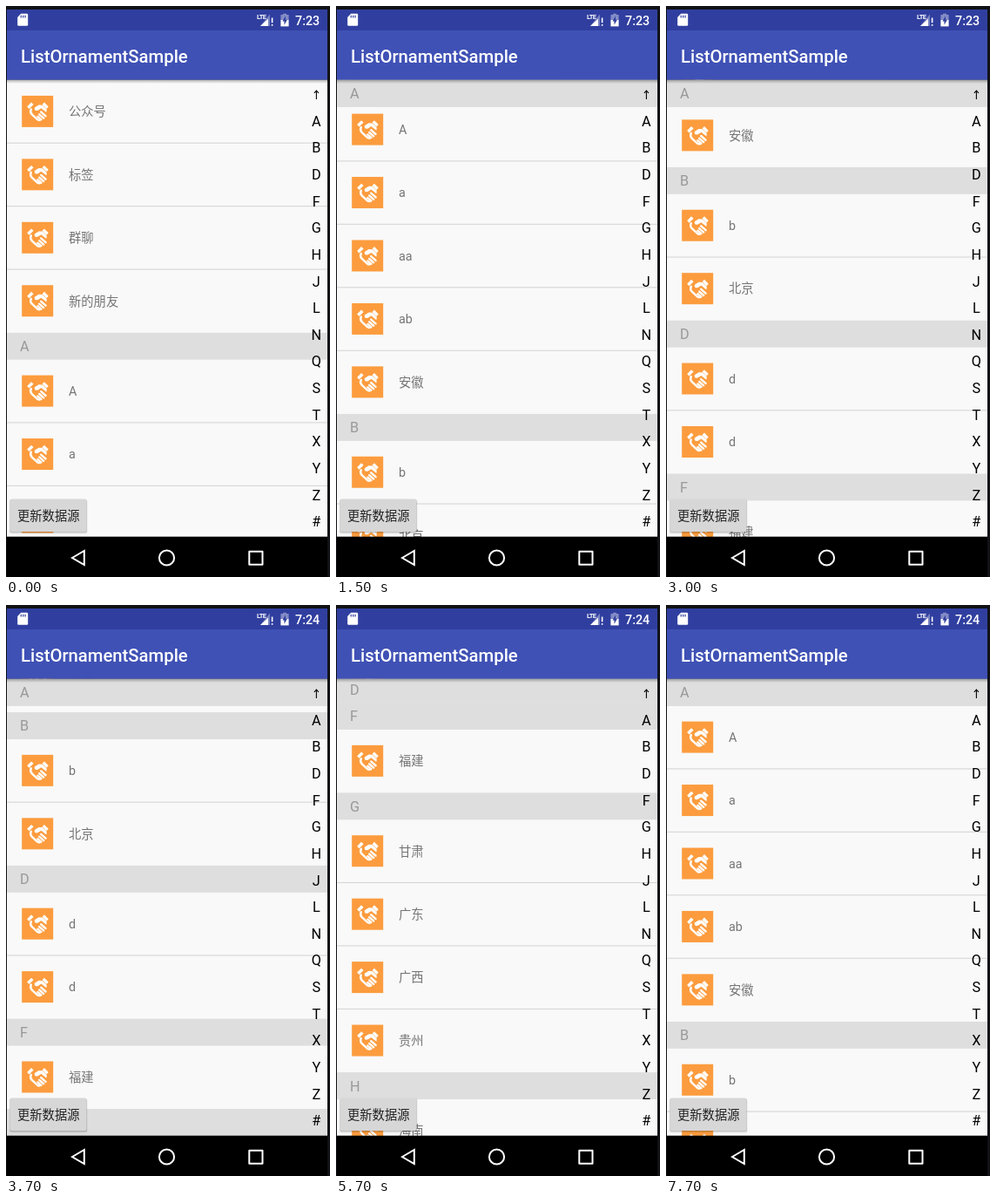
Animation of 372x655 px, one loop 8 s. Source, as an HTML page:

```html
<!DOCTYPE html>
<html lang="zh-CN">
<head>
<meta charset="utf-8">
<title>Sectioned list</title>
<style>
  html, body { margin: 0; width: 100%; height: 100%; overflow: hidden; background: #111216; }
  svg { display: block; width: 100%; height: 100%; }
  text { font-family: Roboto, "Noto Sans CJK SC", "Noto Sans CJK", sans-serif; }
  .row { font-size: 14.3px; fill: #757575; }
  .head { font-size: 16.3px; fill: #999; }
  .index { font-size: 16.3px; fill: #000; text-anchor: middle; }
</style>
</head>
<body>
<svg viewBox="0 0 372 655">
  <defs>
    <clipPath id="view"><rect x="1" y="84.5" width="368" height="525"/></clipPath>
    <linearGradient id="shade" x2="0" y2="1">
      <stop stop-opacity=".3"/>
      <stop offset="1" stop-opacity="0"/>
    </linearGradient>
    <g id="icon">
      <rect width="36" height="36" fill="#fc9c3e"/>
      <g fill="#fff">
        <path d="M6 12.5 10.8 7.6l2.6 2.4-5 5z"/>
        <path d="M30.6 12.5 25.8 7.6l-2.4 2.4 4.8 5z"/>
        <path d="M14.6 13.6 19.4 10.6l4.2.2 5 5-.4 3.4-6-4.8-3.6 2.4q-3.2 1-4-1.2z"/>
      </g>
      <g fill="none" stroke="#fff" stroke-width="2.4" stroke-linecap="round">
        <path d="M10.6 15.5q-1.6 3.4 1 6l6.4 5.9q1.6 1 2.8.4"/>
        <path d="M22 18.6l5.4 4.8M20 21.4l5 4.4M18.2 24l4 3.4"/>
      </g>
    </g>
  </defs>

  <rect x="1" y="84.5" width="368" height="525" fill="#f9f9f9"/>
  <g clip-path="url(#view)">
    <g id="list"></g>
    <g id="sticky"></g>
    <g id="index"></g>
    <path d="M356.4 107V97M353.9 99.9 356.4 97l2.5 2.9" stroke="#000" stroke-width="1.1" fill="none"/>
    <rect x="4" y="566.5" width="89.5" height="39" rx="2.5" opacity=".08"/>
    <rect x="4.3" y="566" width="88.7" height="38.3" rx="2" opacity=".15"/>
    <rect x="4.5" y="565.5" width="88" height="37.5" rx="2" fill="#d7d7d7"/>
    <text x="13" y="589.5" font-size="14.3" fill="#222">更新数据源</text>
    <rect x="1" y="84.5" width="368" height="4.5" fill="url(#shade)"/>
  </g>

  <rect x="1" y="4" width="368" height="24.5" fill="#303f9f"/>
  <rect x="1" y="28" width="368" height="56.6" fill="#3f51b5"/>
  <text x="17" y="65" font-size="20.3" font-weight="500" fill="#fff">ListOrnamentSample</text>

  <g fill="#fff">
    <path d="M17.2 8.7H24q1.2 0 1.2 1.2v11.6q0 1.2-1.2 1.2h-9.6q-1.2 0-1.2-1.2v-8.6z"/>
    <path d="M17.3 10.8v2.6M19.7 10.8v2.6M22.1 10.8v2.6" stroke="#303f9f" stroke-width="1.2"/>
    <text x="288" y="15.2" font-size="7.6" font-weight="700" letter-spacing="-.7">LTE</text>
    <path d="M303 9.5v13.5h-11z" opacity=".35"/>
    <path d="M301 14.5V23h-9z"/>
    <path d="M304.8 13.5h1.6v5.8h-1.6zM304.8 21h1.6v1.8h-1.6z"/>
    <path d="M318 8.7h4v1.4h2.6V16h-9.2v-5.9h2.6z" opacity=".4"/>
    <path d="M315.4 16h9.2v7.4h-9.2z"/>
    <path d="M321 11.5 317.4 17.6h2.1v4.2l3.4-6.1h-1.9z" fill="#303f9f"/>
    <text id="clock" x="332" y="21.5" font-size="14.3" font-weight="500"></text>
  </g>

  <rect x="1" y="608.7" width="368" height="46.3"/>
  <g fill="none" stroke="#fff" stroke-width="2">
    <path d="M76 633 89.8 625v16z"/>
    <circle cx="184.5" cy="633" r="8.6"/>
    <rect x="279.3" y="625.8" width="15.2" height="15" stroke-linejoin="round"/>
  </g>
</svg>
<script>
const LOOP = 8000, STEP = 100, CLOCK_TICK = 3300;
const TOP = 85, ROW = 72.45, HEAD = 30.9;

const groups = [
  ['', '公众号 标签 群聊 新的朋友'],
  ['A', 'A a aa ab 安徽'],
  ['B', 'b 北京'],
  ['D', 'd d'],
  ['F', '福建'],
  ['G', '甘肃 广东 广西 贵州'],
  ['H', '海南 河北 河南 黑龙江 湖北 湖南'],
  ['J', '吉林 江苏 江西']
];

// Finger drags, then two taps on the index: ↑ and A
const moves = [
  { at: 700, steps: 9, to: 300, power: 0.68 },
  { at: 1700, steps: 9, to: 530 },
  { at: 2700, steps: 9, to: 640, power: 0.9 },
  { at: 3600, steps: 9, to: 662 },
  { at: 4500, steps: 5, to: 940, power: 1.4 },
  { at: 5500, steps: 6, to: 1075 },
  { at: 6300, steps: 5, to: 1240 },
  { at: 7600, steps: 1, to: 0 },
  { at: 7700, steps: 1, to: 290 }
];

const $ = id => document.getElementById(id);
const text = (cls, x, y, s) => `<text class="${cls}" x="${x}" y="${y}">${s}</text>`;
const shift = (el, y) => el.setAttribute('transform', `translate(0 ${y.toFixed(2)})`);

const header = (y, label) =>
  `<rect x="1" y="${y}" width="368" height="${HEAD}" fill="#dedede"/>` +
  text('head', 16, y + 21.4, label);

const row = (y, label) =>
  `<use href="#icon" x="18.2" y="${y + 17.9}"/>` + text('row', 72, y + 41.2, label);

const divider = y => `<rect x="1" y="${y - 0.8}" width="368" height="1.1" fill="#d6d6d6"/>`;

const sections = [];
let y = 0, markup = '';
for (const [label, names] of groups) {
  sections.push({ label, top: y });
  if (label) {
    markup += header(y, label);
    y += HEAD;
  }
  names.split(' ').forEach((name, i) => {
    if (i) markup += divider(y);
    markup += row(y, name);
    y += ROW;
  });
}
$('list').innerHTML = markup;
$('index').innerHTML = [...'ABDFGHJLNQSTXYZ#']
  .map((c, i) => text('index', 356.3, 137.6 + i * 30.65, c)).join('');

function scrollAt(t) {
  let pos = 0;
  for (const { at, steps, to, power = 1 } of moves) {
    if (t < at) break;
    const p = Math.min(1, (t - at + STEP) / (steps * STEP));
    pos += (to - pos) * p ** power;
  }
  return pos;
}

let shown = null;
function render(t) {
  const now = Math.floor(t / STEP) * STEP;
  const scroll = scrollAt(now);
  shift($('list'), TOP - scroll);

  // The pinned header is pushed up by the next section
  const n = sections.filter(s => s.top <= scroll).length;
  const { label } = sections[n - 1];
  const next = sections[n] ? sections[n].top : Infinity;
  if (label !== shown) {
    $('sticky').innerHTML = label ? header(0, label) : '';
    shown = label;
  }
  shift($('sticky'), TOP + Math.min(0, next - scroll - HEAD));
  $('clock').textContent = now < CLOCK_TICK ? '7:23' : '7:24';
}

const start = performance.now();
function frame() {
  render((performance.now() - start) % LOOP);
  requestAnimationFrame(frame);
}
frame();
</script>
</body>
</html>
```
